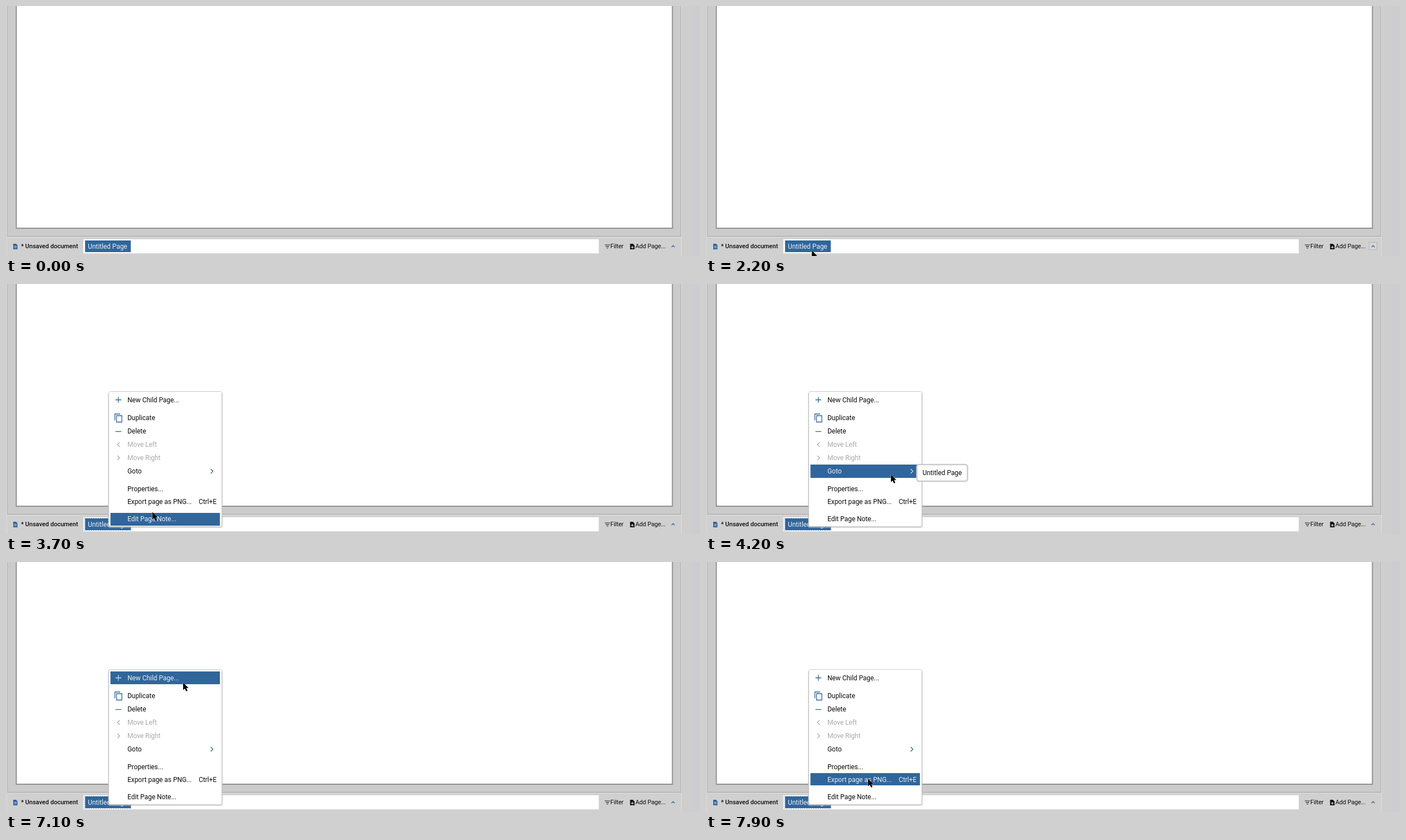
Write an HTML page that moves like this. It is 1246 by 450 pixels and loops after 8 s.

```html
<!DOCTYPE html>
<html lang="en">
<head>
<meta charset="utf-8">
<title>Page context menu</title>
<style>
  html, body { margin: 0; width: 100%; height: 100%; overflow: hidden; background: #cecece; }
  svg { display: block; width: 100%; height: 100%; }
  text { font: 12px Roboto, "Noto Sans", sans-serif; letter-spacing: -.05px; fill: #0c0c10; white-space: pre; }
  .bar { font-size: 11px; letter-spacing: -.15px; }
  .title { font-size: 11px; font-weight: 500; letter-spacing: 0; }
  .tab { fill: #e8eff6; }
  .icon { fill: none; stroke: #2f6299; stroke-width: 1.3; }
  .off text { fill: #a9a9a9; }
  .off .icon { stroke: #a9a9a9; }
  .row rect { fill: none; }
  .on rect { fill: #30669c; }
  .on text { fill: #e8eff6; }
  .on .icon { stroke: #c5d8ea; }
</style>
</head>
<body>
<svg viewBox="0 0 1246 450" preserveAspectRatio="none">
  <rect width="1246" height="450" fill="#cecece"/>
  <rect x="1232" width="14" height="450" fill="#cdccd0"/>
  <path d="M1.5 0V450M1212.5 0V450" stroke="#dedede"/>
  <path d="M2.5 0V415M1211.5 0V415" stroke="#adadad"/>
  <rect x="3" width="1208" height="415" fill="#cbcbcb"/>
  <rect x="18.5" y="-5" width="1178" height="405" fill="#fff" stroke="#929292" stroke-width="2"/>
  <path d="M3 414.5H1212" stroke="#a3a3a3"/>
  <rect x="3" y="415" width="1209" height="35" fill="#d0d0d0"/>
  <path d="M3 415.9H1212" stroke="#e0e0e0"/>

  <path d="M13 428h5l2.5 2.5v7.5h-7.5z" fill="#2f6299"/>
  <path d="M14.5 432.5h4.5M14.5 435h4.5" stroke="#d5dfe9"/>
  <text class="title" x="27" y="436.3">* Unsaved document</text>
  <rect x="138.5" y="419.5" width="926" height="26" fill="#fff" stroke="#dadada"/>
  <rect x="142" y="422" width="82" height="21" fill="#30669c"/>
  <text class="tab" x="147" y="437">Untitled Page</text>
  <rect id="focus" x="140.5" y="421.5" width="84" height="22" fill="none" stroke="#7f9fbf" stroke-dasharray="2 2"/>

  <path d="M1075 430h9.5M1076.8 432.9h6M1078.3 435.8h3" stroke="#222" stroke-width="1.1"/>
  <text class="bar" x="1085" y="436.3">Filter</text>
  <path d="M1120.5 428h5l3 3v7h-8z" fill="#0c0c10"/>
  <path d="M1122 434.3h5M1124.5 432v4.6" stroke="#eee" stroke-width="1.1"/>
  <text class="bar" x="1130" y="436.3">Add Page...</text>
  <rect id="collapse" x="1190.5" y="425.5" width="14" height="13" fill="#d6d6d6" stroke="#b0b4b8"/>
  <path class="icon" d="M1195 434l2.7-2.8 2.7 2.8"/>

  <g id="menu">
    <rect x="183" y="195" width="206" height="244" rx="4" fill="#bdbdbd" opacity=".6"/>
    <rect x="184.5" y="193.5" width="203" height="243" rx="3" fill="#fff" stroke="#c9c9c9"/>
    <g id="rows"></g>
  </g>
  <g id="submenu">
    <rect x="378.5" y="325" width="91" height="30" rx="4" fill="#fff" stroke="#cacaca" stroke-width="2.4"/>
    <text x="388.7" y="344">Untitled Page</text>
  </g>
  <path id="pointer" d="M0 0V13.5L3.1 10.7 5.4 15.8 7.9 14.7 5.7 9.8H9.7Z" fill="#050505" stroke="#eee" stroke-width=".8" paint-order="stroke"/>
</svg>
<script>
const LOOP = 8000, STEP = 100;
const byId = id => document.getElementById(id);

const chevron = (x, y, dir) => `M${x - 2 * dir} ${y - 4}l${4 * dir} 4l${-4 * dir} 4`;

// label, center y, top, bottom, icon path, disabled, shortcut
const items = [
  ["New Child Page...", 208.5, 197, 220, "M196.5 208.5h10.5M201.7 203.3v10.5"],
  ["Duplicate", 241, 229, 253, "M195.5 245.5v-11.5h9.5M198.5 237h9.5v11.5h-9.5z"],
  ["Delete", 265, 254, 278, "M196.5 265.5h10.5"],
  ["Move Left", 289, 278, 301, chevron(202, 289, -1), true],
  ["Move Right", 313, 301, 325, chevron(202, 313, 1), true],
  ["Goto", 337, 325, 349, chevron(369.5, 337, 1)],
  ["Properties...", 369, 358, 380, ""],
  ["Export page as PNG...", 391.3, 380, 402, "", false, "Ctrl+E"],
  ["Edit Page Note...", 422.7, 412, 435, ""]
];
byId("rows").innerHTML = items.map(([label, y, top, bottom, icon, off, keys]) => `
  <g class="row${off ? " off" : ""}">
    <rect x="187.5" y="${top}" width="196.5" height="${bottom - top}"/>
    <path class="icon" d="${icon}"/>
    <text x="218" y="${y + 4.4}">${label}</text>
    ${keys ? `<text x="378" y="${y + 4.4}" text-anchor="end">${keys}</text>` : ""}
  </g>`).join("");
const rows = [...byId("rows").children];

// time, x, y
const path = [
  [400, 590, -20], [900, 366, 237], [1400, 232, 385], [1800, 182, 437],
  [2200, 190, 440], [2800, 190, 440], [3300, 249, 424], [3600, 249, 424],
  [4200, 332, 343], [5300, 332, 345], [5600, 323, 282], [5900, 318, 230],
  [6100, 317, 211], [6400, 318, 217], [7100, 318, 217], [7500, 303, 315], [7900, 291, 390]
];
// time, highlighted row
const hovers = [
  [0, -1], [3000, 8], [3800, 7], [3900, 6], [4000, 5], [5400, -1],
  [5600, 2], [5700, 1], [5900, 0], [7200, 1], [7300, 2], [7400, -1],
  [7500, 5], [7700, 6], [7800, 7]
];

function pointAt(t) {
  const next = path.findIndex(p => p[0] > t);
  if (next === 0) return path[0].slice(1);
  if (next < 0) return path[path.length - 1].slice(1);
  const [t0, x0, y0] = path[next - 1], [t1, x1, y1] = path[next];
  const k = (t - t0) / (t1 - t0);
  return [x0 + (x1 - x0) * k, y0 + (y1 - y0) * k];
}

const show = (id, visible) => byId(id).setAttribute("visibility", visible ? "visible" : "hidden");

function draw(now) {
  const t = Math.floor((now % LOOP) / STEP) * STEP;
  const open = t >= 2400;
  show("menu", open);
  show("focus", open);
  show("collapse", t >= 500 && !open);
  show("submenu", t >= 4100 && t < 5800);
  const active = hovers.filter(h => h[0] <= t).pop()[1];
  rows.forEach((row, i) => row.classList.toggle("on", i === active));
  byId("pointer").setAttribute("transform", `translate(${pointAt(t)})`);
  requestAnimationFrame(() => draw(performance.now()));
}
draw(performance.now());
</script>
</body>
</html>
```
